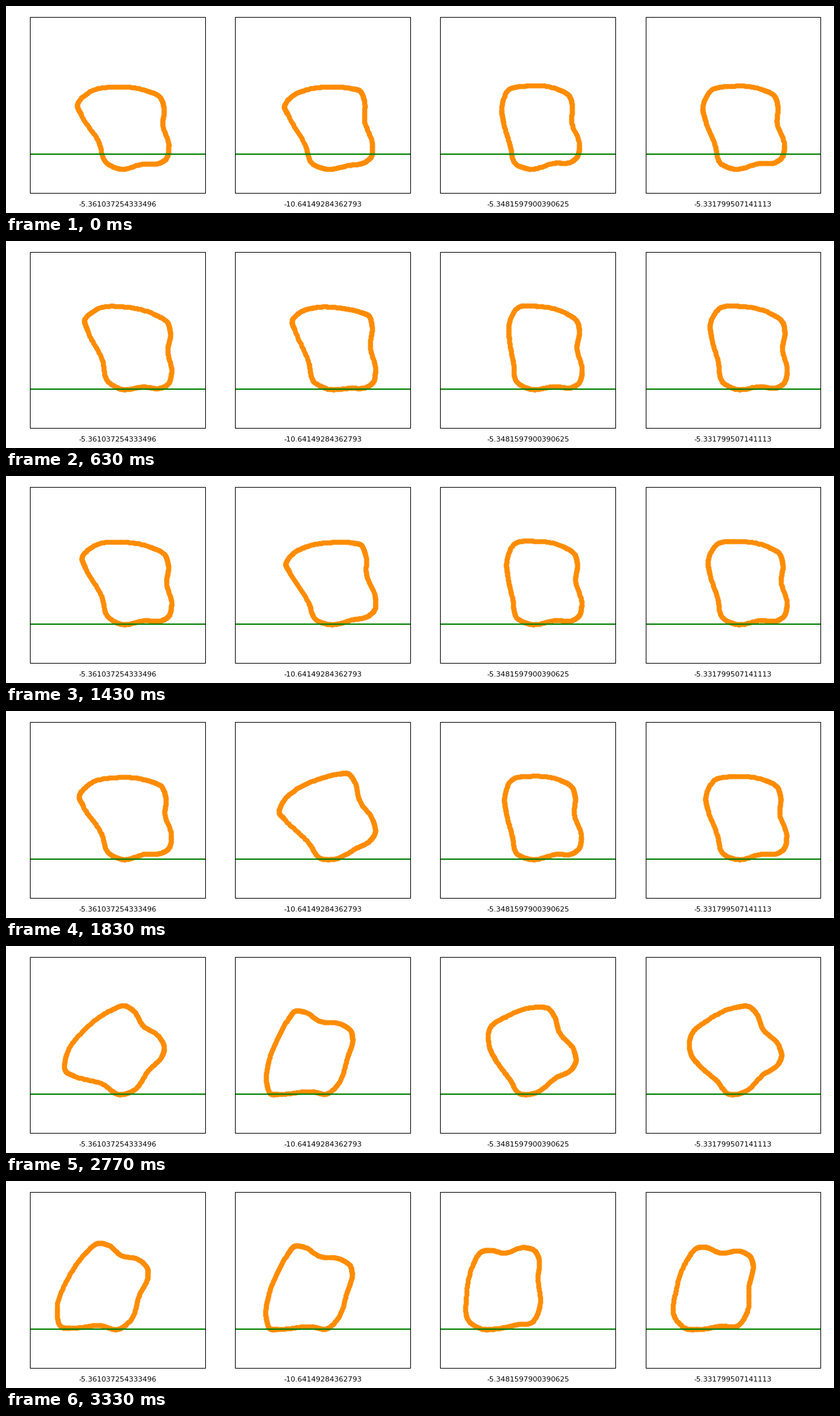
Write a matplotlib script that moves like this. It is 1280x320 px and loops after 3.36 s.

```python
import numpy as np
import matplotlib.pyplot as plt
from matplotlib.animation import FuncAnimation
from matplotlib.patches import Rectangle

WIDTH, HEIGHT, DPI = 1280, 320, 100
FRAMES, LOOP_MS = 101, 3360
PIXEL = 72 / DPI                      # one pixel in points

LEFT, TOP, SIDE, TALL, STEP = 37.25, 17, 270.6, 272, 317.1
GROUND = 229

ASPECT = 8 / 9                        # horizontal scale relative to vertical
START_DEPTH = 22.5                    # how far bodies start below the ground
ROLL = 1.05                           # pixels rolled per degree
DRIFT, GROWTH = 0.06, 0.073           # steady and exponential tipping per frame
SLIDE, SLIDE_TIME = 12, 5             # skid after landing, in pixels and frames

# Key points of the outlines, clockwise from the left bulge.
SLIM = np.array([(132, 160), (143, 130), (172, 124), (218, 129), (236, 139),
                 (241, 154), (240, 179), (252, 216), (249, 233), (240, 241),
                 (213, 243.5), (175, 252.5), (153, 244), (145, 216), (135, 181)])
WIDE = np.array([(110, 153), (127, 133.5), (172, 124.5), (215, 130), (238, 141),
                 (244, 158), (242, 183), (251.5, 217), (247, 236), (238, 242),
                 (210, 244), (176, 251.5), (154, 241), (143, 210), (116, 168)])
SHARP = np.array([(113, 156), (124, 140), (150, 128.5), (186, 125), (218, 127.5),
                  (230, 131), (236.5, 146), (237, 178), (249, 213), (247, 233),
                  (238, 241), (213, 246), (177, 251.5), (155, 242), (146, 217),
                  (118, 167)])


def closed_curve(points, count=16):
    """Smooth closed curve through the points, as complex numbers."""
    p = points @ np.array([1, 1j])
    step = np.roll(p, -1) - p
    h = np.abs(step)
    slope, h_prev = step / h, np.roll(h, 1)
    tangent = (np.roll(slope, 1) * h + slope * h_prev) / (h + h_prev)
    u = np.linspace(0, 1, count, endpoint=False)[:, None]
    curve = (p + step * u * u * (3 - 2 * u)
             + h * u * (1 - u) * (tangent * (1 - u) - np.roll(tangent, -1) * u))
    return curve.T.ravel()


class Body:
    """Outline kicked clockwise off the ground that then tips over to the left."""

    def __init__(self, label, points, kick, lean, grip, rest):
        z = closed_curve(points)
        z = z.real / ASPECT + 1j * z.imag
        self.label, self.kick, self.lean, self.grip = label, kick, lean, grip
        self.centre = z.mean().real * ASPECT
        self.shape = z - z.mean()
        self.max_fall = kick + rest
        times = np.linspace(0, FRAMES, 1000)
        self.landing = np.interp(self.max_fall, self.fall(times), times)

    def fall(self, t):
        return DRIFT * t + self.lean * np.expm1(GROWTH * t)

    def outline(self, t):
        kick = self.kick * (1 - np.exp(-t / 3))
        fall = min(self.fall(t), self.max_fall)
        skid = SLIDE * (1 - np.exp(-max(t - self.landing, 0) / SLIDE_TIME))
        z = self.shape * np.exp(1j * np.radians(kick - fall))
        x = z.real * ASPECT + self.centre + ROLL * (kick - self.grip * fall) - skid
        depth = START_DEPTH * np.exp(-t / 2)
        return x, z.imag - z.imag.max() + GROUND + 0.5 + depth


BODIES = [
    Body("-5.361037254333496", WIDE, kick=7.6, lean=0.099, grip=0.5, rest=58.5),
    Body("-10.64149284362793", SHARP, kick=9, lean=0.407, grip=0.5, rest=61.7),
    Body("-5.3481597900390625", SLIM, kick=8, lean=0.057, grip=0.7, rest=90),
    Body("-5.331799507141113", 0.73 * SLIM + 0.27 * WIDE,
         kick=8, lean=0.072, grip=0.58, rest=73.5),
]

fig = plt.figure(figsize=(WIDTH / DPI, HEIGHT / DPI), dpi=DPI, facecolor="white")
ax = fig.add_axes([0, 0, 1, 1])
ax.set(xlim=(0, WIDTH), ylim=(HEIGHT, 0))
ax.axis("off")

outlines = []
for i, body in enumerate(BODIES):
    left = LEFT + STEP * i
    ax.add_patch(Rectangle((left, TOP), SIDE, TALL, fill=False,
                           edgecolor="black", linewidth=PIXEL, zorder=3))
    ax.plot([left, left + SIDE], [GROUND, GROUND], color="green",
            linewidth=2 * PIXEL, solid_capstyle="butt", zorder=2)
    ax.text(left + SIDE / 2, 310, body.label, fontsize=8,
            family="DejaVu Sans", ha="center", va="baseline")
    outlines += ax.plot([], [], "o", color="darkorange", zorder=1,
                        markersize=7.8 * PIXEL, markeredgewidth=0)


def draw(frame):
    for i, (line, body) in enumerate(zip(outlines, BODIES)):
        x, y = body.outline(frame)
        line.set_data(x + 317 * i, y)
    return outlines


anim = FuncAnimation(fig, draw, frames=FRAMES, interval=LOOP_MS / FRAMES,
                     repeat=True, repeat_delay=0, blit=False)
plt.show()
```
